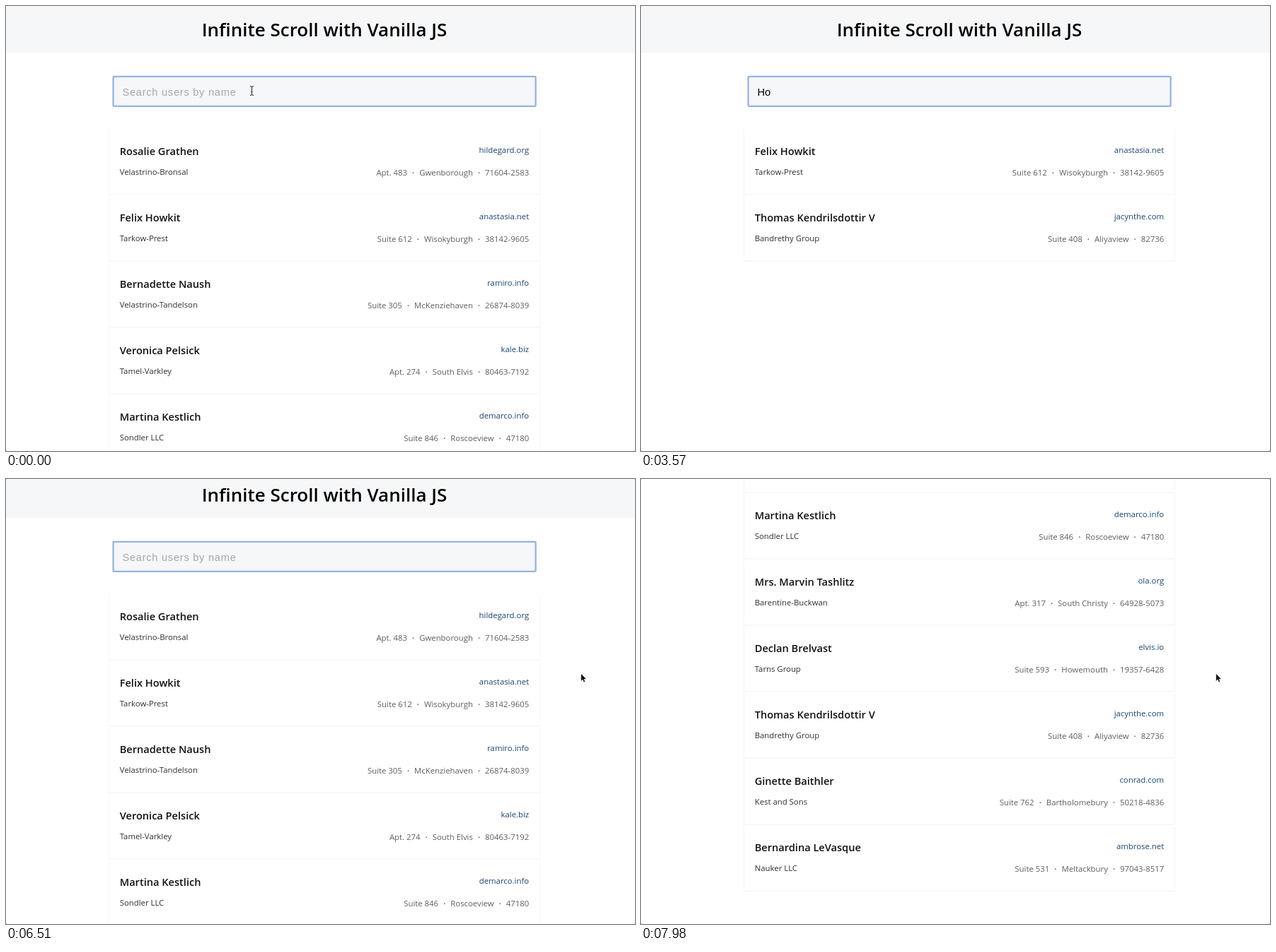
Recreate the animation shown at these times as an HTML page. Size 889 px wide and 630 px high, loop 8000 ms.

```html
<!DOCTYPE html>
<html lang="en">
<head>
<meta charset="utf-8">
<title>Infinite Scroll with Vanilla JS</title>
<style>
  html, body { margin: 0; width: 100%; height: 100%; overflow: hidden; background: #aaa; }
  svg { display: block; width: 889px; height: 630px; background: #fff; border-radius: 2px; }
  text { font-family: "Open Sans", sans-serif; font-size: 11.375px; white-space: pre; }
  .title { font-size: 26px; font-weight: 600; text-anchor: middle; text-shadow: 1.5px 1.5px 0 #fff; }
  .name { font-size: 14.6px; font-weight: 600; fill: #111; }
  .company { fill: #303030; }
  .link { fill: #1a4570; text-anchor: end; }
  .place { fill: #5e5e5e; text-anchor: end; }
  .dot { font-weight: 600; fill: #444; }
  .edge { fill: none; stroke: #f1f1f1; }
  .side { fill: none; stroke: #f7f7f7; }
  .bar { fill: #f6f7f9; }
  .field { fill: #f6f7f9; stroke: #94b4e0; stroke-width: 2.3; }
  .hint, .typed { font: 14.63px "Liberation Sans", Arial, sans-serif; }
  .hint { letter-spacing: .74px; fill: #a5a6a8; }
</style>
</head>
<body>
<svg viewBox="0 0 889 630">
  <g id="page">
    <rect class="bar" width="889" height="66"/>
    <text class="title" x="450" y="42.7">Infinite Scroll with Vanilla JS</text>
    <rect class="field" x="151.6" y="99.8" width="597" height="42" rx="1"/>
    <text class="hint" id="hint" x="164.4" y="126.5">Search users by name</text>
    <text class="typed" id="typed" x="164.4" y="126.5"></text>
    <rect id="caret" y="112.5" width="1" height="17"/>
    <g id="list"></g>
    <g id="dots"><circle r="4.1"/><circle r="4.1"/><circle r="4.1"/></g>
  </g>
  <path id="beam" d="M-2.5-6.5Q0-6.5 0-5Q0-6.5 2.5-6.5M0-5V5M-2.5 6.5Q0 6.5 0 5Q0 6.5 2.5 6.5M-1 1.5H1" fill="none" stroke="#222"/>
  <path id="arrow" d="M0 0V10.8L2.4 8.5L4 12.3L5.8 11.5L4.2 7.8H7.5Z" stroke="#fff" stroke-width=".5"/>
</svg>
<script>
const LOOP = 8000, STEP = 70, ROW = 94, TOP = 173;

const users = [
  ["Rosalie Grathen", "Velastrino-Bronsal", "hildegard.org", "Apt. 483", "Gwenborough", "71604-2583"],
  ["Felix Howkit", "Tarkow-Prest", "anastasia.net", "Suite 612", "Wisokyburgh", "38142-9605"],
  ["Bernadette Naush", "Velastrino-Tandelson", "ramiro.info", "Suite 305", "McKenziehaven", "26874-8039"],
  ["Veronica Pelsick", "Tamel-Varkley", "kale.biz", "Apt. 274", "South Elvis", "80463-7192"],
  ["Martina Kestlich", "Sondler LLC", "demarco.info", "Suite 846", "Roscoeview", "47180"],
  ["Mrs. Marvin Tashlitz", "Barentine-Buckwan", "ola.org", "Apt. 317", "South Christy", "64928-5073"],
  ["Declan Brelvast", "Tarns Group", "elvis.io", "Suite 593", "Howemouth", "19357-6428"],
  ["Thomas Kendrilsdottir V", "Bandrethy Group", "jacynthe.com", "Suite 408", "Aliyaview", "82736"],
  ["Ginette Baithler", "Kest and Sons", "conrad.com", "Suite 762", "Bartholomebury", "50218-4836"],
  ["Bernardina LeVasque", "Nauker LLC", "ambrose.net", "Suite 531", "Meltackbury", "97043-8517"]
];

// [time, search text]
const keys = [
  [0, ""], [420, "G"], [770, "Gr"], [980, "Gra"],
  [1960, "Gr"], [2030, "G"], [2100, ""],
  [3220, "H"], [3430, "Ho"], [3640, "How"],
  [4410, "Ho"], [4480, "H"], [4550, ""]
];
const caretOn = [[1680, 1960], [2520, 3010], [4200, 4410], [4760, 5250]];
const scrollStart = 6440;
const scrollPath = [0, 11, 110, 256, 390, 482, 524, 530];

const $ = id => document.getElementById(id);
const page = $("page"), list = $("list"), hint = $("hint"), typed = $("typed");
const caret = $("caret"), dots = $("dots"), beam = $("beam"), arrow = $("arrow");

const label = (cls, x, y, content) => `<text class="${cls}" x="${x}" y="${y}">${content}</text>`;
const dotted = parts => parts.join(' <tspan class="dot" dx="4.07">·</tspan> <tspan dx="4.07">') +
  "</tspan>".repeat(parts.length - 1);

list.innerHTML = users.map(([name, company, site, ...place]) =>
  "<g>" +
  `<path class="side" d="M145.5 2V${ROW}M754.5 2V${ROW}"/>` +
  `<path class="edge" d="M145 ${ROW}H755"/>` +
  label("name", 160.7, 38, name) +
  label("company", 160.7, 66, company) +
  label("link", 739.2, 34.6, site) +
  label("place", 739.2, 67, dotted(place)) +
  "</g>").join("");

const clamp = v => Math.min(1, Math.max(0, v));
const smooth = v => v * v * (3 - 2 * v);
const easeIn = v => v ** 1.7;
const show = (el, on) => { el.style.visibility = on ? "visible" : "hidden"; };
const move = (el, x, y) => el.setAttribute("transform", `translate(${x} ${y})`);

function drawSearch(t) {
  const query = keys.findLast(k => k[0] <= t)[1];
  typed.textContent = query;
  show(hint, !query);
  const width = query ? typed.getComputedTextLength() : 0;
  caret.setAttribute("x", 164.4 + width);
  show(caret, caretOn.some(([from, to]) => t >= from && t < to));

  let slot = 0;
  users.forEach(([name], i) => {
    const hit = name.toLowerCase().includes(query.toLowerCase());
    show(list.children[i], hit);
    if (hit) move(list.children[i], 0, TOP + ROW * slot++);
  });
}

function drawScroll(t) {
  const last = scrollPath.length - 1;
  const i = Math.round(clamp((t - scrollStart) / STEP / last) * last);
  move(page, 0, -scrollPath[i]);
}

function drawDots(t) {
  const fadeIn = easeIn(clamp((t - 6650) / 280));
  const fadeOut = easeIn(clamp((t - 7660) / 300));
  dots.style.opacity = fadeIn * (1 - fadeOut);
  [...dots.children].forEach((c, i) => {
    const phase = (t - 6785 - 100 * i + LOOP) % 500 / 250;
    const lift = phase < 1 ? easeIn(phase) : 1 - easeIn(phase - 1);
    c.setAttribute("cx", 434 + 16 * i);
    c.setAttribute("cy", 1153.4 - 4.5 * lift);
  });
}

function drawPointer(t) {
  const p = smooth(clamp((t - 5740) / 630));
  const x = 347.5 + 465.2 * p, y = 120 + 155.5 * p;
  const shown = t < 420 || t >= 5740, inField = y < 142;
  show(beam, shown && inField);
  show(arrow, shown && !inField);
  move(beam, x, y);
  move(arrow, x, y);
}

function frame() {
  const t = Math.floor(performance.now() % LOOP / STEP) * STEP;
  drawSearch(t);
  drawScroll(t);
  drawDots(t);
  drawPointer(t);
  requestAnimationFrame(frame);
}
frame();
</script>
</body>
</html>
```
